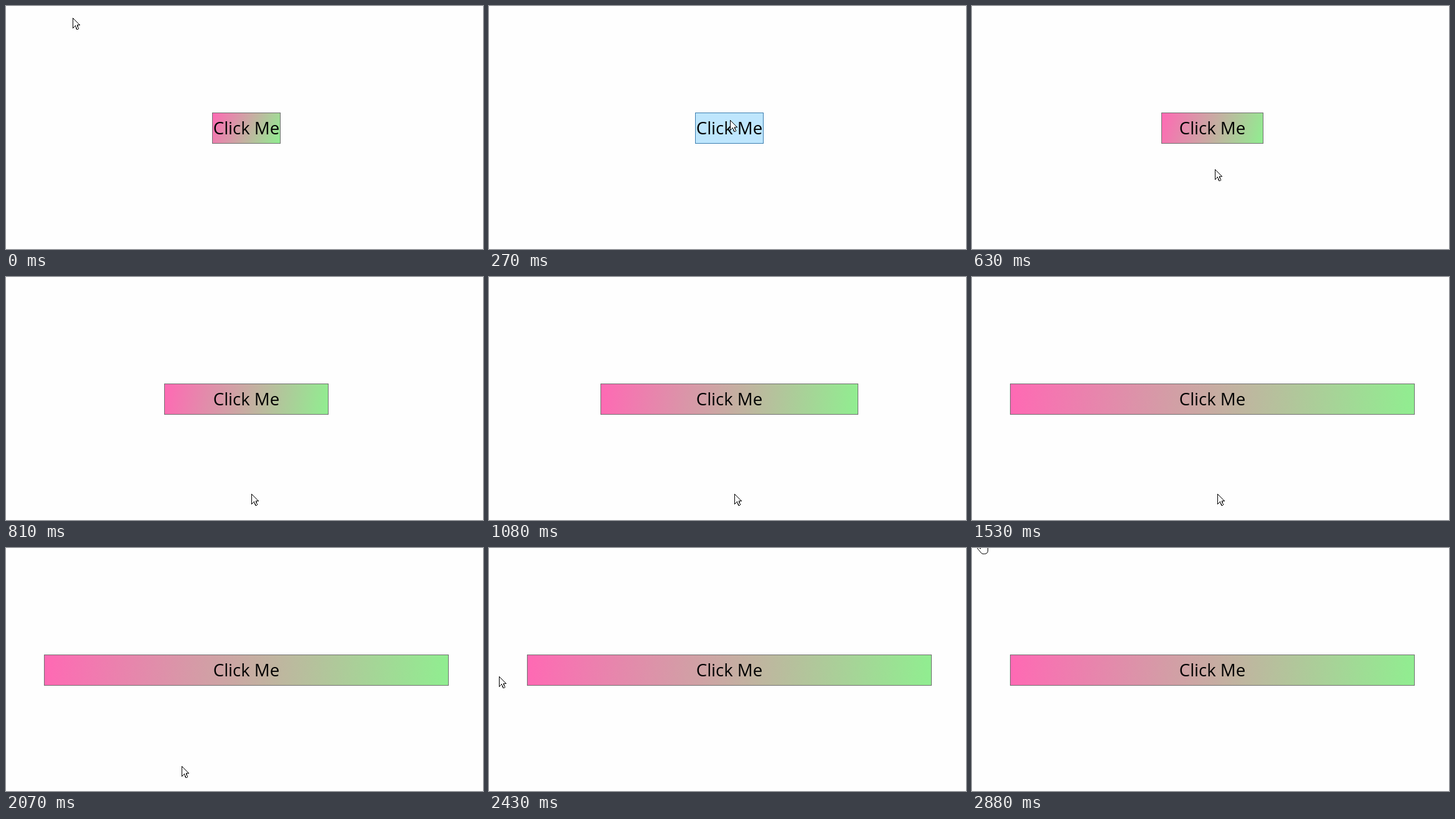
An HTML page that plays this animation: 766x390 px, repeating every 3060 ms.

```html
<!DOCTYPE html>
<html lang="en">
<head>
<meta charset="utf-8">
<title>Growing button</title>
<style>
  html, body { margin: 0; width: 100%; height: 100%; overflow: hidden; background: #fefefe; }
  svg { display: block; width: 100%; height: 100%; }
  text { font: 27.6px "Open Sans", "Noto Sans", sans-serif; text-anchor: middle; }
  .cursor { fill: #fff; stroke: #000; }
  #arrow { shape-rendering: crispEdges; }
</style>
</head>
<body>
<svg viewBox="0 0 766 390">
  <linearGradient id="fade" gradientUnits="userSpaceOnUse" y1="172" y2="220">
    <stop stop-color="#ff69b4"/>
    <stop offset="1" stop-color="#90ee90"/>
  </linearGradient>
  <rect id="button" y="171.5" height="49"/>
  <text x="386" y="205.5">Click Me</text>
  <path id="arrow" class="cursor" d="M.5 .5V16.5L4.3 12.7 6.9 18.5H8.5L9.5 17 7.2 11.5H11.5Z"/>
  <path id="hand" class="cursor" d="M5.5 13V2a1.6 1.6 0 0 1 3.2 0V8q3-.8 3.2 1 2.8-.6 3 1 2.6-.4 2.6 2v4q0 5.5-6 5.5h-1.5q-2.5 0-4-2.5L1 13q-1-2.5 1.2-2.5 1.5 0 3.3 3"/>
</svg>
<script>
const LOOP = 3060, STEP = 90, CENTER = 386;
const [fade, button, arrow, hand] = ["fade", "button", "arrow", "hand"].map(id => document.getElementById(id));

// Progress from 0 to 1 between two times
const ramp = (time, start, end) => Math.min(1, Math.max(0, (time - start) / (end - start)));

const buttonWidth = time => 110 + 540 * ramp(time, 535, 1500);

// The pointer goes to the button, settles, drops below it, sweeps left and leaves at the top
function pointer(time) {
  const approach = ramp(time, 0, 270);
  const settle = ramp(time, 270, 360);
  const drop = ramp(time, 450, 720) ** 2;
  const sweep = ramp(time, 1980, 2520);
  const leave = ramp(time, 2520, 2880);
  const sweepX = 1 - (1 - sweep) ** 1.85;
  const sweepY = sweep ** 2 * (1.5 * sweep - 0.5);
  return [
    107 + 280 * approach + 7 * drop - 392 * sweepX + 6 * leave,
    19 + 164 * approach + 11 * settle + 154 * drop - 273 * sweepY - 87 * leave
  ].map(Math.round);
}

function setAll(node, attributes) {
  for (const name in attributes) node.setAttribute(name, attributes[name]);
}

function draw(now) {
  const time = Math.floor(now % LOOP / STEP) * STEP;
  const half = Math.round(buttonWidth(time) / 2);
  const [x, y] = pointer(time);
  const hover = Math.abs(x - CENTER) < half && y >= 171 && y < 221;
  const active = y < 10 ? hand : arrow;

  setAll(fade, { x1: CENTER - half + 1, x2: CENTER + half - 1 });
  setAll(button, {
    x: CENTER - half + 0.5,
    width: 2 * half - 1,
    fill: hover ? "#bee6fd" : "url(#fade)",
    stroke: hover ? "#3c7fb1" : "#707070"
  });
  for (const cursor of [arrow, hand]) {
    setAll(cursor, {
      transform: `translate(${x} ${y})`,
      visibility: cursor === active ? "visible" : "hidden"
    });
  }
  requestAnimationFrame(draw);
}

draw(performance.now());
</script>
</body>
</html>
```
